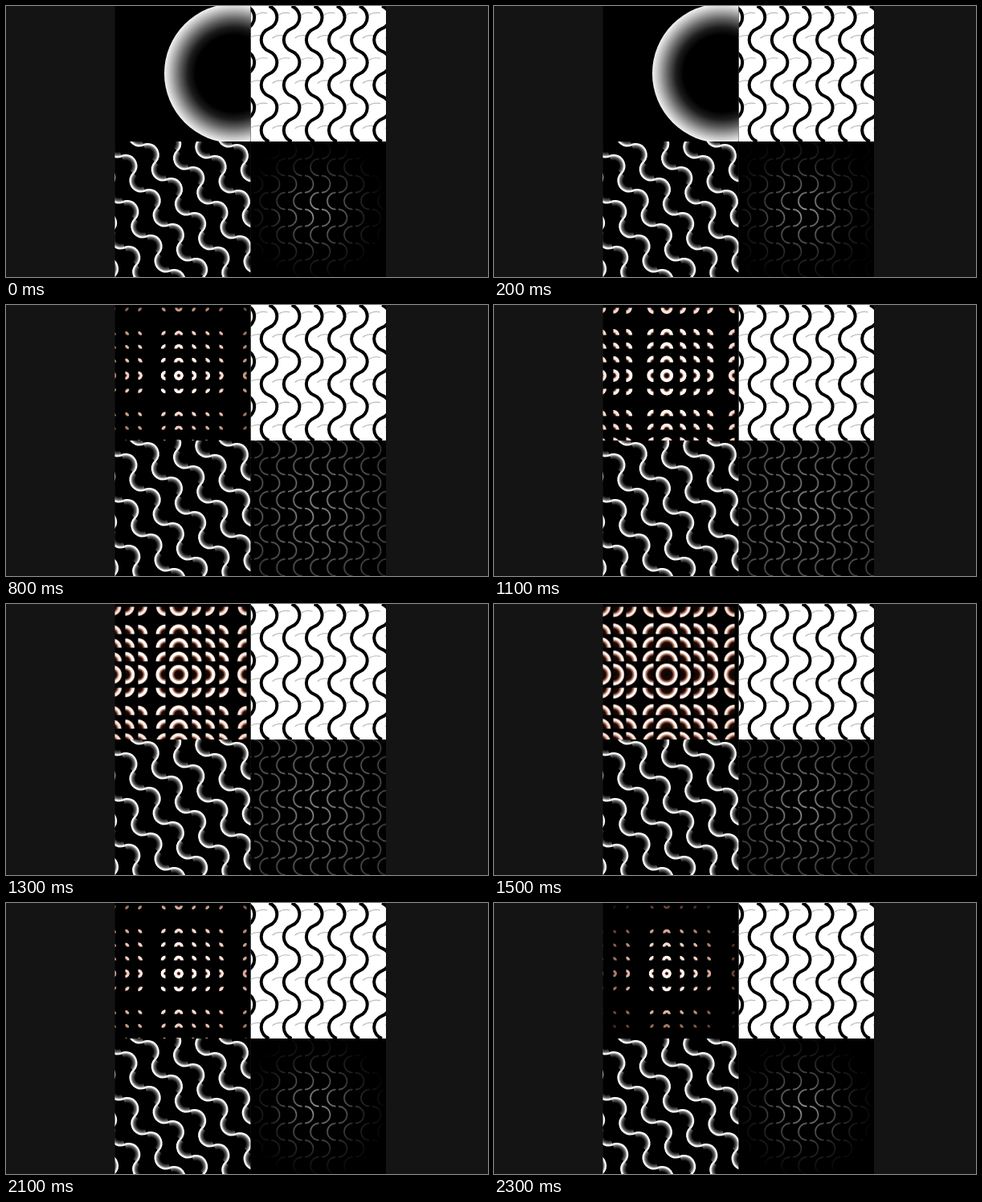
These frames come from a looping animation (600x338 px, 2400 ms). An HTML page with a canvas:

```html
<!DOCTYPE html>
<html lang="en">
<head>
<meta charset="utf-8">
<title>Four patterns</title>
<style>
  html, body { margin: 0; width: 100%; height: 100%; overflow: hidden; background: #141414; }
  canvas { display: block; width: 600px; height: 338px; }
</style>
</head>
<body>
<canvas id="stage" width="600" height="338"></canvas>
<script>
const ctx = document.getElementById('stage').getContext('2d');
const LOOP = 2400, STEP = 100, RING_END = 400;
const TAU = Math.PI * 2;

// Position and facing of each column and row of the kaleidoscope.
const cols = [[134, 1], [150, 1], [166, 1], [197, -1], [215, 0], [233, 1], [250, 1], [267, 1], [298, -1]];
const rows = [[5, 1], [36, -1], [53, -1], [70, -1], [88, 0], [106, 1], [137, -1], [154, -1], [171, -1]];

function panel(x, y, w, h, fill, draw) {
  ctx.save();
  ctx.beginPath();
  ctx.rect(x, y, w, h);
  ctx.clip();
  ctx.fillStyle = fill;
  ctx.fillRect(x, y, w, h);
  draw();
  ctx.restore();
}

function radial(x, y, r, stops) {
  const g = ctx.createRadialGradient(x, y, 0, x, y, r);
  for (const [at, color] of stops) g.addColorStop(at, color);
  return g;
}

function stroke(path, color, width) {
  ctx.strokeStyle = color;
  ctx.lineWidth = width;
  ctx.stroke(path);
}

function drawRing() {
  ctx.fillStyle = radial(284, 84, 87, [
    [0, '#000'], [0.55, '#000'], [0.66, '#1c1c1c'], [0.78, '#626262'],
    [0.9, '#b4b4b4'], [1, '#f4f4f4']
  ]);
  ctx.beginPath();
  ctx.arc(284, 84, 87, 0, TAU);
  ctx.fill();
}

function drawPetals(t) {
  const wave = (1 + Math.cos(TAU * (t - 1470) / LOOP)) / 2;
  const peak = wave ** 5;
  const reach = 74 + 300 * wave ** 1.5;
  ctx.globalCompositeOperation = 'lighten';
  for (const [x, dx] of cols) for (const [y, dy] of rows) {
    const near = Math.max(0, Math.min(1, 1.15 - Math.hypot(x - 215, y - 88) / reach));
    if (!near) continue;
    const r = (6 + 8.2 * peak) * (0.5 + 0.5 * near);
    const cx = x - dx * 1.5, cy = y - dy * 1.5;
    const hole = 0.16 + 0.32 * peak;
    const bright = `hsl(18, 55%, ${40 + 60 * near}%)`;
    ctx.save();
    ctx.beginPath();
    ctx.rect(dx > 0 ? cx : cx - r, dy > 0 ? cy : cy - r, dx ? r : 2 * r, dy ? r : 2 * r);
    ctx.clip();
    ctx.globalAlpha = Math.min(1, 1.4 * near);
    ctx.fillStyle = radial(cx, cy, r, [
      [0, '#080302'], [hole, '#1a0a06'], [hole + 0.15, '#a8654c'],
      [hole + 0.3, bright], [0.9, bright], [1, '#7b4935']
    ]);
    ctx.beginPath();
    ctx.arc(cx, cy, r, 0, TAU);
    ctx.fill();
    ctx.restore();
  }
}

// Vertical chain of arcs bulging right, then left, and so on.
function chain(x, y, step, r, count) {
  let d = `M${x} ${y}`;
  for (let i = 0; i < count; i++) d += `a${r} ${r} 0 0 ${i % 2 ? 0 : 1} 0 ${step}`;
  return d;
}

function buildWaves() {
  const lines = new Path2D(), ticks = new Path2D();
  const cell = 28.17;
  for (let k = -1; k < 6; k++) {
    const x = 327.5 + 28.1 * k;
    lines.addPath(new Path2D(chain(x, 0, cell, 15, 6)));
    for (let i = 0; i < 6; i++) {
      const tx = x + (i % 2 ? 4 : 11), ty = i * cell + 12;
      ticks.moveTo(tx, ty);
      ticks.quadraticCurveTo(tx + 6, ty - 5, tx + 15, ty - 3);
    }
  }
  return { lines, ticks };
}

// Separate half circles, one row facing right and the next facing left.
function buildScales() {
  const path = new Path2D(), size = 21.05;
  for (let i = 0; i < 8; i++) for (let k = -1; k < 10; k++) {
    const left = i % 2;
    const x = (left ? 305.5 : 309) + 21 * k, y = 169.5 + size * (i + 0.5);
    path.moveTo(x, y - size / 2);
    path.arc(x, y, size / 2, -TAU / 4, TAU / 4, left === 1);
  }
  return path;
}

const waves = buildWaves(), scales = buildScales();

// An arc whose outer edge is sharp and whose inner side fades out.
function glowArc(x, y, r, from, to) {
  ctx.strokeStyle = radial(x, y, r + 1, [
    [0, 'rgba(255,255,255,0)'], [0.48, 'rgba(255,255,255,0)'],
    [0.75, 'rgba(255,255,255,.4)'], [0.9, '#fff'], [1, '#fff']
  ]);
  ctx.lineWidth = 8;
  ctx.beginPath();
  ctx.arc(x, y, r - 3, from, to);
  ctx.stroke();
}

function drawSlopes() {
  const halfX = 14.6, halfY = 21.5, r = 13.6;
  const along = Math.atan2(halfY, halfX), out = along - TAU / 4;
  const inset = 2.8, spread = TAU / 4 - Math.asin(inset / r);
  const ox = Math.cos(out) * inset, oy = Math.sin(out) * inset;
  for (let line = -7; line < 8; line++) for (let i = -10; i < 12; i++) {
    const side = i % 2 ? -1 : 1;
    const x = 178.5 + 27.3 * line + halfX * i - side * ox;
    const y = 184 - 14 * line + halfY * i - side * oy;
    if (x < 115 || x > 325 || y < 150 || y > 360) continue;
    const mid = side > 0 ? out : out + Math.PI;
    glowArc(x, y, r, mid - spread, mid + spread);
  }
}

function drawScales(t) {
  const open = ((1 - Math.cos(TAU * (t + 100) / LOOP)) / 2) ** 1.4;
  const gray = a => `rgba(215,215,215,${a})`;
  const glow = a => radial(386, 254, 90 + 55 * open, [
    [0, gray(a)], [0.3, gray(a * (0.6 + 0.15 * open))],
    [0.65, gray(a * (0.2 + 0.32 * open))], [1, gray(a * 0.3 * open)]
  ]);
  stroke(scales, glow(0.16), 3);
  stroke(scales, glow(0.72 - 0.12 * open), 1.2);
}

function render(t) {
  ctx.fillStyle = '#141414';
  ctx.fillRect(0, 0, 600, 338);
  panel(135.5, 0, 169, 169, '#000', () => t < RING_END ? drawRing() : drawPetals(t));
  panel(304.5, 0, 168.5, 169, '#fff', () => {
    stroke(waves.ticks, '#bbb', 1.2);
    stroke(waves.lines, '#000', 4);
  });
  panel(135.5, 169, 169, 169, '#000', drawSlopes);
  panel(304.5, 169, 168.5, 169, '#000', () => drawScales(t));
}

const start = performance.now();
function tick() {
  const t = (performance.now() - start) % LOOP;
  render(Math.floor(t / STEP) * STEP);
  requestAnimationFrame(tick);
}
tick();
</script>
</body>
</html>
```
